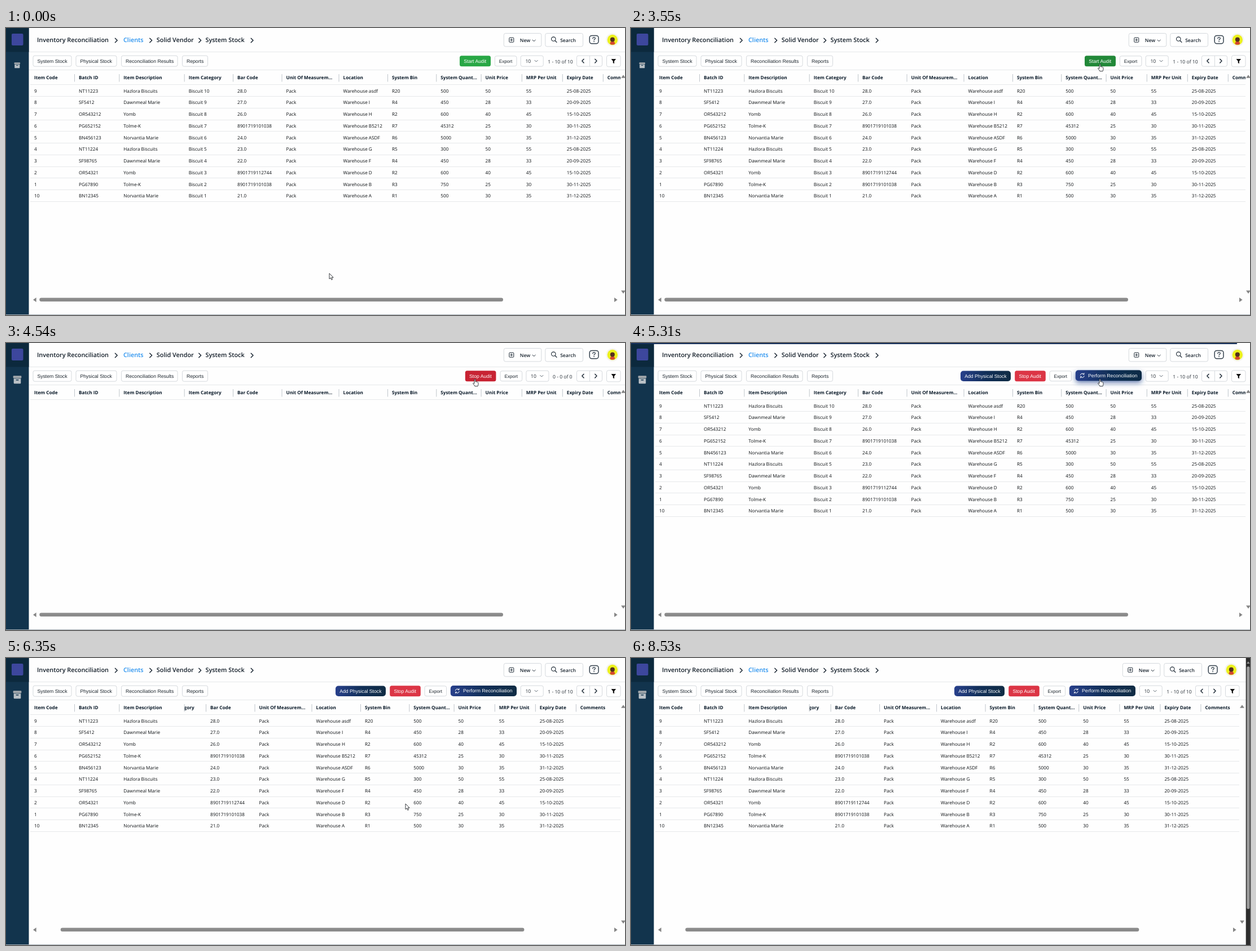
An HTML page that plays this animation: 1097x510 px, repeating every 8.75 s.

```html
<!DOCTYPE html>
<html lang="en">
<head>
<meta charset="utf-8">
<title>Inventory Reconciliation</title>
<style>
  html, body { margin: 0; width: 100%; height: 100%; overflow: hidden; background: #fefefe; }
  svg { display: block; width: 100%; height: 100%; }
  text { font-family: "Open Sans", "Noto Sans", sans-serif; font-size: 8.2px; fill: #0c1013; white-space: pre; text-rendering: geometricPrecision; }
  .crumb { font-size: 10.85px; font-weight: 600; fill: #101b26; }
  .head { font-weight: 700; fill: #071726; }
  .top { font-size: 8.5px; font-weight: 600; fill: #17222d; }
  .page { font-size: 8.6px; fill: #262e36; }
  .btn { font-family: "Liberation Sans", Arial, sans-serif; font-size: 8.7px; fill: #1c252d; }
  .small { font-size: 8.15px; }
  .light { fill: #fff; }
</style>
</head>
<body>
<svg id="stage" viewBox="0 0 1097 510" xmlns="http://www.w3.org/2000/svg"></svg>
<script>
const LOOP = 8750;
const CLICK_DONE = 4000, DATA_BACK = 5000, NARROW = 8530;
const DARK = '#1b2733', LINE = '#e6e8ea', EDGE = '#d5d9dd';

const text = (x, y, s, cls = '') => `<text x="${x}" y="${y}" class="${cls}">${s}</text>`;
const rect = (x, y, w, h, fill, r = 0, extra = '') =>
  `<rect x="${x}" y="${y}" width="${w}" height="${h}" rx="${r}" fill="${fill}" ${extra}/>`;
const circle = (x, y, r, fill) => `<circle cx="${x}" cy="${y}" r="${r}" fill="${fill}"/>`;
const stroke = (d, color = DARK, w = 1.2) =>
  `<path d="${d}" fill="none" stroke="${color}" stroke-width="${w}" stroke-linecap="round" stroke-linejoin="round"/>`;
const shape = (d, fill) => `<path d="${d}" fill="${fill}"/>`;
const group = (id, body) => `<g id="${id}">${body}</g>`;
const box = (x, y, w, h, r = 3) => rect(x, y, w, h, '#fff', r, `stroke="${EDGE}" stroke-width="1"`);
const hline = (x1, x2, y, color = LINE) => rect(x1, y, x2 - x1, 1, color);

// Sidebar
const archive = (cx, cy, k) => `<g transform="translate(${cx} ${cy}) scale(${k})">` +
  rect(-7.3, -7, 14.6, 4.2, '#a3a8ac', 1) +
  shape('M-6.3-2H6.3V5.8Q6.3 7 5.1 7H-5.1Q-6.3 7-6.3 5.8Z', '#b9c0c5') +
  rect(-2.5, -.4, 5, 1.5, '#12344d', .7) + '</g>';

const sidebar = rect(0, 0, 40.5, 510, '#12344d') + rect(0, 0, 40.5, 42.5, '#0c293d') +
  rect(10, 10, 20.5, 21, '#3d479d', 2) +
  group('iconSmall', archive(19.8, 66.3, .72)) + group('iconLarge', archive(20, 65.3, 1));

// Breadcrumbs and tabs
const crumbs = [[55, 'Inventory Reconciliation'], [208, 'Clients'], [266.8, 'Solid Vendor'], [353.5, 'System Stock']]
  .map(([x, s], i) => `<text x="${x}" y="24.8" class="crumb"${i === 1 ? ' style="fill:#2490ef"' : ''}>${s}</text>`).join('') +
  [193.4, 254.8, 341.8, 434.2].map(x => stroke(`M${x} 18.2l3.8 3.8-3.8 3.8`, DARK, 1.5)).join('');

const tabs = [[48, 68, 'System Stock'], [124, 72, 'Physical Stock'], [204.5, 99.5, 'Reconciliation Results'], [312.5, 45, 'Reports']]
  .map(([x, w, s]) => box(x, 49.2, w, 19) + text(x + 7.4, 61.7, s, 'btn')).join('');

// Right-aligned header and toolbar
const header =
  box(882.3, 9.5, 66.5, 23.4) + rect(891.8, 17.2, 8, 8, 'none', 1, `stroke="${DARK}"`) +
  stroke('M895.8 19.2v4M893.8 21.2h4', DARK, 1) + text(910.8, 24.6, 'New', 'top') +
  stroke('M933.2 21.2l2.5 2.4 2.5-2.4', DARK, 1) +
  box(955.8, 9.5, 66.7, 23.4) + `<circle cx="970.3" cy="19.6" r="3.7" fill="none" stroke="${DARK}" stroke-width="1.1"/>` +
  stroke('M973 22.5l3 3', DARK, 1.1) + text(982.2, 24.6, 'Search', 'top') +
  rect(1034.2, 13.4, 15.8, 14.4, 'none', 4, 'stroke="#34414d" stroke-width="1.5"') +
  stroke('M1039.8 18.7q.2-2.1 2.3-2.1 2.2 0 2.2 1.9c0 1.5-2.2 1.7-2.2 3.2', '#34414d', 1.3) +
  circle(1042.1, 24.2, .9, '#34414d') +
  circle(1074.8, 21, 11.5, '#f5f3ec') + circle(1074.8, 21, 9.2, '#ecf11c') +
  shape('M1070.4 28.2q0-4.4 4.4-4.4t4.4 4.4q-4.4 3.2-8.8 0z', '#d4472f') +
  circle(1074.8, 20.4, 4, '#54301f');

const pager = group('select', box(912.2, 49.2, 40, 19) + text(920.4, 61.8, '10', 'page') +
  stroke('M937 57.4l2.6 2.6 2.6-2.6', '#5b6670', 1)) +
  `<text id="range" y="62.5" class="page"></text>` +
  box(1011.5, 49.2, 45, 19) + rect(1034, 49.2, 1, 19, EDGE) +
  stroke('M1024 55.3l-3.2 3.3 3.2 3.3M1043.8 55.3l3.2 3.3-3.2 3.3', DARK, 1.5) +
  box(1064.5, 48.8, 24.5, 20) + shape('M1072.5 55h8.6l-3.2 4v4.2l-2.2-1.2v-3z', '#111');

const fill = (id, x, y, w, h, color, label, tx) =>
  group(id, rect(x, y, w, h, color, 3.5, `id="${id}Bg"`) + text(tx, 61.7, label, 'btn light'));

const refresh = stroke('M796.4 57.8a3.5 3.5 0 0 1 6.3-1.4M803.2 59.4a3.5 3.5 0 0 1-6.3 1.4', '#fff', 1) +
  stroke('M803 54.3v2.3h-2.2M796.6 62.9v-2.3h2.2', '#fff', .9);

const actions =
  fill('start', 804, 49.3, 55, 18.9, '#28a745', 'Start Audit', 811.2) +
  fill('stop', 813.8, 49.3, 54.6, 18.9, '#c82333', 'Stop Audit', 821) +
  group('export', box(866.3, 49.8, 38.6, 17.9) + text(873.8, 61.5, 'Export', 'btn small')) +
  group('recon',
    group('add', rect(584, 49.5, 89, 18.5, 'url(#navy)', 5) + text(591.2, 61.8, 'Add Physical Stock', 'btn light')) +
    group('perform', rect(787.8, 49, 117.2, 19, 'url(#navy)', 5, 'id="performBg"') + refresh +
      text(810, 61.4, 'Perform Reconciliation', 'btn light')));

// Table
const columns = [[50, 'Item Code'], [129, 'Batch ID'], [208.3, 'Item Description'], [323.7, 'Item Category'],
  [410, 'Bar Code'], [496.5, 'Unit Of Measurem...'], [597.5, 'Location'], [684, 'System Bin'],
  [770.3, 'System Quant...'], [849.6, 'Unit Price'], [921.8, 'MRP Per Unit'], [993.8, 'Expiry Date'], [1065.8, 'Comments']];

const products = [
  ['Hazlora Biscuits', '50', '55', '25-08-2025'],
  ['Dawnmeal Marie', '28', '33', '20-09-2025'],
  ['Yomb', '40', '45', '15-10-2025'],
  ['Tolme-K', '25', '30', '30-11-2025'],
  ['Norvantia Marie', '30', '35', '31-12-2025']];

const stock = `9|NT11223|28.0|asdf|R20|500
8|SF5412|27.0|I|R4|450
7|OR543212|26.0|H|R2|600
6|PG652152|8901719101038|B5212|R7|45312
5|BN456123|24.0|ASDF|R6|5000
4|NT11224|23.0|G|R5|300
3|SF98765|22.0|F|R4|450
2|OR54321|8901719112744|D|R2|600
1|PG67890|8901719101038|B|R3|750
10|BN12345|21.0|A|R1|500`.split('\n').map((line, i) => {
  const [code, batch, bar, place, bin, qty] = line.split('|');
  const [name, ...prices] = products[i % 5];
  return [code, batch, name, `Biscuit ${10 - i}`, bar, 'Pack', `Warehouse ${place}`, bin, qty, ...prices];
});

const PINNED = 3, ROW = 20.74;
const heads = (from, to) => columns.slice(from, to).map(([x, s]) => text(x, 91, s, 'head')).join('');
const seps = (from, to) => columns.slice(from, to).map(([x]) => rect(x - 8, 82, 1, 13.5, '#bfc5cb')).join('');
const cells = (from, to) => stock.map((row, i) => row.slice(from, to)
  .map((s, c) => text(columns[from + c][0], (114.6 + i * ROW).toFixed(2), s)).join('')).join('');

const table =
  '<g clip-path="url(#tableClip)">' + hline(43, 1097, 100) +
  group('rowLines', stock.map((_, i) => hline(43, 1097, Math.round(121.2 + i * ROW))).join('')) + '</g>' +
  heads(0, PINNED) + seps(1, PINNED + 1) + group('pinnedCells', cells(0, PINNED)) +
  '<g clip-path="url(#scrollClip)">' +
  group('scroller', heads(PINNED) + seps(PINNED + 1) + group('cells', cells(PINNED))) + '</g>';

const bars = shape('M48 483l5.6-4v8z', '#858585') +
  rect(59.3, 479.4, 821.7, 6.6, '#8b8b8b', 3.3, 'id="thumb"') +
  group('rightArrows', shape('M1083.6 483l-5.6-4v8z', '#858585') +
    shape('M1094 83.2l4 5.6h-8zM1094 472l4-5.6h-8z', '#858585'));

const pageBar = group('pageBar', rect(1089.7, 0, 8, 510, '#2d2d2d') +
  rect(1091.3, 15, 5, 431, '#9c9c9c', 2.5) + shape('M1093.8 6l2.6 4h-5.2z', '#9c9c9c'));

const arrow = group('arrow', '<path d="M0 0v10l2.3-2.1 1.6 3.6 1.7-.8-1.6-3.4h3.1z" fill="#fff" stroke="#23262b" stroke-width=".9" stroke-linejoin="round"/>');
const hand = group('hand', '<path d="M-.9 6.9V1Q-.9 0 0 0t1 1v3.6l3.3.6q1.6.4 1.6 2v2.3q0 1.5-.8 2.7v.6H-.2v-.7L-3 8.6q-.7-1.1.2-1.6.7-.3 1.9 1z" fill="#fff" stroke="#23262b" stroke-width=".9" stroke-linejoin="round"/>');

const stage = document.getElementById('stage');
stage.innerHTML = `<defs>
  <linearGradient id="navy"><stop offset="0" stop-color="#28408c"/><stop offset=".5" stop-color="#112f58"/><stop offset="1" stop-color="#102c44"/></linearGradient>
  <filter id="glow" x="-20%" y="-100%" width="140%" height="320%"><feDropShadow dx="0" dy="3.5" stdDeviation="4" flood-color="#1f3c88" flood-opacity=".65"/></filter>
  <clipPath id="tableClip"><rect id="tableBox" x="40" y="75" width="1049" height="400"/></clipPath>
  <clipPath id="scrollClip"><rect id="scrollBox" x="316.5" y="75" width="772.5" height="400"/></clipPath></defs>` +
  rect(0, 0, 1097, 510, '#fefefe') + hline(40, 1097, 42) + hline(40, 1097, 74) +
  crumbs + tabs + table + bars +
  group('right', header + pager + actions) +
  sidebar + hline(0, 1097, 509, '#a3adb5') + pageBar +
  rect(0, 0, 0, 2, '#16305a', 1, 'id="progress"') +
  group('cursor', arrow + hand);

const el = Object.fromEntries([...stage.querySelectorAll('[id]')].map(e => [e.id, e]));
const show = (id, on) => { el[id].style.display = on ? '' : 'none'; };
const set = (id, name, value) => el[id].setAttribute(name, value);
const move = (id, x, y = 0) => set(id, 'transform', `translate(${x} ${y})`);
const part = (t, a, b) => Math.min(1, Math.max(0, (t - a) / (b - a)));
const smooth = p => p * p * (3 - 2 * p);
const mix = (a, b, p) => a + (b - a) * p;
const blend = (a, b, p) => `rgb(${a.map((v, i) => Math.round(mix(v, b[i], p)))})`;

// Pointer stops: time, x, y
const path = [[0, 573, 436], [1600, 573, 436], [1870, 814, 171], [2120, 814, 171], [2600, 831, 64],
  [5310, 831, 64], [5720, 708, 259], [6640, 708, 259], [6980, 627, 62], [7150, 653, 60],
  [7270, 735, 150], [7490, 848, 431], [7800, 848, 431], [8110, 819, 416], [LOOP, 819, 416]];

function pointer(t) {
  const i = path.findIndex(k => k[0] > t);
  const [t0, x0, y0] = path[i - 1], [t1, x1, y1] = path[i];
  const p = smooth(part(t, t0, t1));
  return [mix(x0, x1, p), mix(y0, y1, p)];
}

function draw(t) {
  const before = t < CLICK_DONE, after = t >= DATA_BACK, empty = !before && !after;
  const narrow = t >= NARROW, shift = narrow ? -11 : 0;

  show('start', before);
  show('stop', !before);
  show('recon', after);
  show('iconSmall', before);
  show('iconLarge', !before);
  ['rowLines', 'pinnedCells', 'cells'].forEach(id => show(id, !empty));

  set('startBg', 'fill', blend([40, 167, 69], [33, 136, 56], part(t, 2540, 2720)));
  set('stopBg', 'fill', after ? '#dc3545' : '#c82333');
  move('stop', after ? -133.6 : 0);
  move('export', after ? -124.3 : empty ? 9.7 : 0);
  move('select', empty ? 9.7 : 0);
  el.range.textContent = empty ? '0 - 0 of 0' : '1 - 10 of 10';
  set('range', 'x', empty ? 969 : 960.3);

  const hover = after && t < 5400;
  move('perform', 0, hover ? -.8 : 0);
  set('performBg', 'filter', hover ? 'url(#glow)' : 'none');

  set('progress', 'width', 1074 * smooth(part(t, 4560, 5310)) + 23 * part(t, 5310, 5400));
  set('progress', 'opacity', 1 - part(t, 5400, 5600));

  const scroll = 48.4 * (1 - (1 - part(t, 6130, 6420)) ** 3.3);
  move('scroller', -scroll);
  set('thumb', 'x', 59.3 + scroll * (narrow ? .765 : .78));
  set('thumb', 'width', narrow ? 804 : 821.7);

  move('right', shift);
  move('rightArrows', shift);
  set('tableBox', 'width', 1049 + shift);
  set('scrollBox', 'width', 772.5 + shift);
  show('pageBar', narrow);

  const onButton = t >= 2520 && t < 5380;
  show('cursor', !narrow);
  show('hand', onButton);
  show('arrow', !onButton);
  move('cursor', ...pointer(t));
}

const begin = performance.now();
function tick() {
  draw((performance.now() - begin) % LOOP);
  requestAnimationFrame(tick);
}
tick();
</script>
</body>
</html>
```
